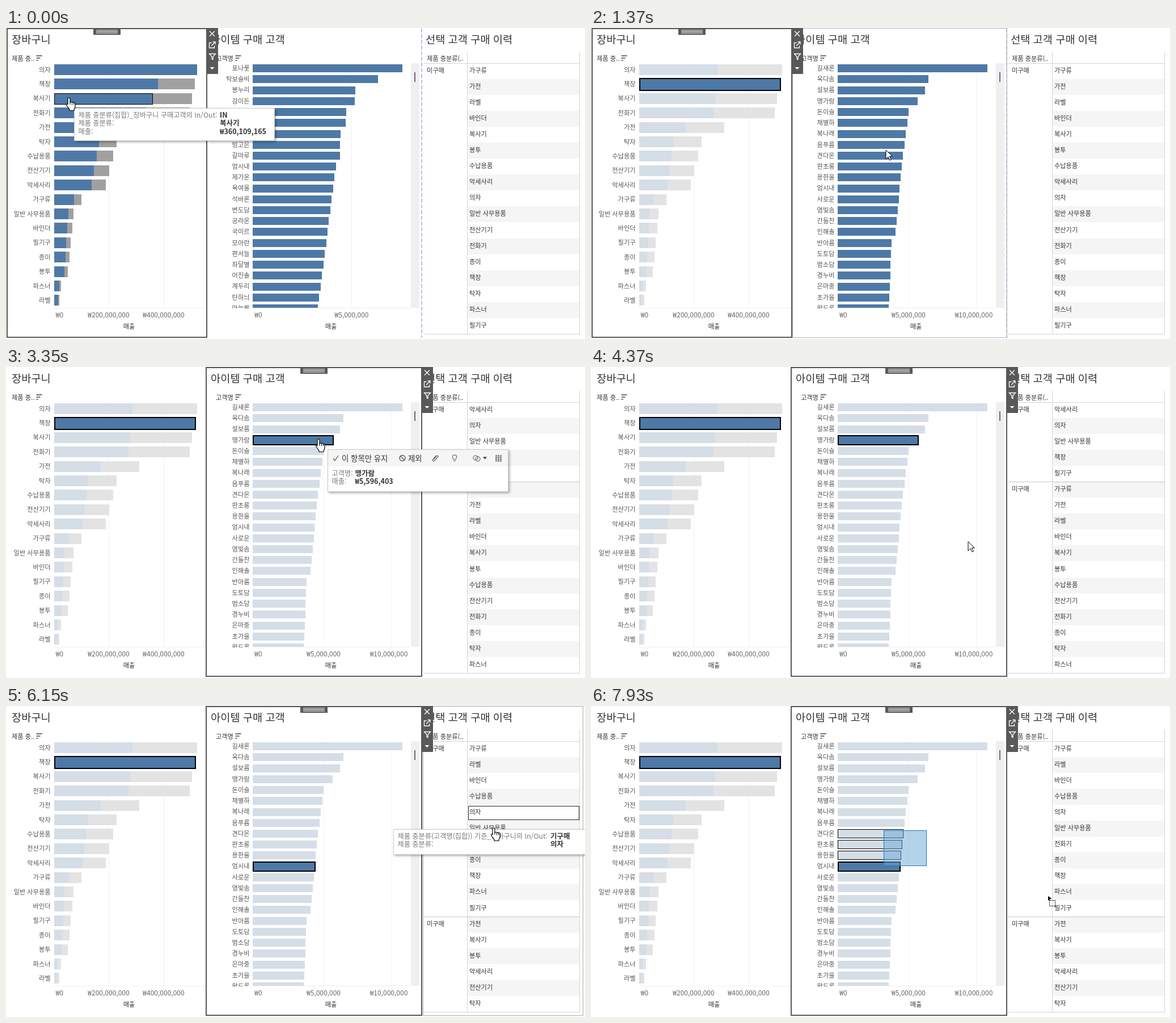
Recreate the animation shown at these times as an HTML page. Size 1021 by 548 pixels, loop 8 s.

```html
<!DOCTYPE html>
<html lang="ko">
<head>
<meta charset="utf-8">
<title>장바구니</title>
<style>
  html, body { margin: 0; width: 100%; height: 100%; overflow: hidden; background: #fff; }
  svg { display: block; width: 1021px; height: 548px; }
  rect { shape-rendering: crispEdges; }
  text { font: 11.2px "Noto Sans CJK KR", "Noto Sans CJK", "Noto Sans", sans-serif; fill: #333; white-space: pre; }
  .title { font-size: 18.7px; }
  .end { text-anchor: end; fill: #555; }
  .mid { text-anchor: middle; }
  .tick { text-anchor: middle; font-size: 12px; fill: #666; }
  .key { font-size: 12.2px; fill: #787878; }
  .val { font-size: 12.5px; font-weight: 700; }
  .cmd { font-size: 13.4px; }
  .tip { filter: drop-shadow(2px 2px 2px #0005); }
</style>
</head>
<body>
<svg viewBox="0 0 1021 548"><g id="base"></g><g id="live"></g></svg>
<script>
const BLUE = '#4e79a7', GREY = '#a0a0a0', PALE_BLUE = '#d5dde7', PALE_GREY = '#e3e3e3', DARK = '#595959';
const LOOP = 8000, STEP = 70;
const PICK_ITEM = 890, RELOAD = 1030, PICK_A = 2880, SHOW_A = 3350, LEAVE_A = 3550;
const PICK_B = 5250, LEAVE_B = 5530, AIM = 7030, DRAG = 7310, DROP = 7790;

// Straight lines through a few [index, value] points
const curve = (...pts) => i => {
  const k = Math.max(1, pts.findIndex(p => p[0] >= i)), [x0, y0] = pts[k - 1], [x1, y1] = pts[k];
  return y0 + (y1 - y0) * (i - x0) / (x1 - x0);
};

const items = '의자,책장,복사기,전화기,가전,탁자,수납용품,전산기기,악세사리,가구류,일반 사무용품,바인더,필기구,종이,봉투,파스너,라벨'.split(',');
const sorted = [...items].sort();
const itemEnd = curve([0, 337], [3, 324], [4, 235], [5, 195], [8, 176], [9, 133], [10, 119], [14, 109], [15, 97], [16, 94]);
const shareAll = curve([0, 1], [1, .74], [3, .68], [4, .76], [5, .72], [16, .75]);
const sharePick = () => .55;
const inEnd = (i, share) => 84.5 + (itemEnd(i) - 84.5) * share(i);

const buyers = [
  {
    names: '표나룻 탁보슬비 봉누리 감이든 피노을 방울찬 옥다솜 빙고은 갈마루 엄시내 제가온 육여울 석바론 변도담 공라온 국미르 모아란 편서늘 좌달별 어진솔 계두리 탄하늬 마늘봄'.split(' '),
    end: curve([0, 699], [1, 656], [2, 615.5], [3, 614.5], [4, 600], [5, 599], [6, 589.5], [8, 588.5], [9, 581.5], [22, 550]),
    ticks: [[609.5, '₩5,000,000']]
  },
  {
    names: '길새론 옥다솜 설보름 맹가람 돈이슬 채별하 복나래 음푸름 견다온 판초롱 용한울 엄시내 사로운 염빛솜 간들찬 인해솔 반아름 도토담 범소담 경누비 은마중 초가을 왕도롬'.split(' '),
    end: curve([0, 699], [1, 595], [2, 588.5], [3, 575.5], [4, 560], [9, 548], [15, 537], [16, 530], [22, 525]),
    ticks: [[560, '₩5,000,000'], [680, '₩10,000,000']]
  }
];
const bought = {
  3: ['악세사리', '의자', '일반 사무용품', '책장', '필기구'],
  11: ['가구류', '라벨', '바인더', '수납용품', '의자', '일반 사무용품', '전화기', '종이', '책장', '파스너', '필기구']
};
const itemSales = { 1: 380511201, 2: 360109165 };
const buyerSales = { 3: 5596403, 11: 4331430 };

// Pointer moves: start, end, goal
const home = [111, 123], corner = [516, 219];
const moves = [
  [70, 820, 246, 97],
  [RELOAD, 1370, 520, 215],
  [1570, 2320, 553, 129],
  [2390, 2670, 551, 127],
  [LEAVE_A, 3820, 840, 250],
  [4090, 4580, 560, 290],
  [4780, 4920, 505, 284],
  [LEAVE_B, 6000, 860, 200],
  [6150, 6150, 860, 215],
  [6220, 6900, 604, 228],
  [AIM, 7240, ...corner],
  [DRAG, DROP, 591, 281],
  [7860, 7930, 806, 335]
];

// Each move sags a little, in proportion to its width.
function pointer(t) {
  let [x, y] = home;
  for (const [a, b, gx, gy] of moves) {
    if (t < a) break;
    const count = Math.floor((b - a) / STEP) + 1;
    const p = Math.min(1, (Math.floor((t - a) / STEP) + 1) / count);
    const sag = Math.abs(gx - x) * .5 * p * (1 - p);
    x += (gx - x) * p;
    y += (gy - y) * p + sag;
  }
  return [x, y];
}

const text = (x, y, s, cls = '') => `<text x="${x}" y="${y}" class="${cls}">${s}</text>`;
const rect = (x, y, w, h, fill, more = '') => `<rect x="${x}" y="${y}" width="${w}" height="${h}" fill="${fill}" ${more}/>`;
const line = (d, color, w = 1, more = '') => `<path d="${d}" fill="none" stroke="${color}" stroke-width="${w}" ${more}/>`;
const box = (x, y, w, h, color, sw, fill = 'none') => rect(x, y, w, h, fill, `stroke="${color}" stroke-width="${sw}"`);
const won = n => '₩' + n.toLocaleString('en-US');
const itemY = i => 74 + 25.4 * i;
const buyerY = i => 71.2 + 19.22 * i;
const cellY = i => 61.5 + 28.1 * i;
const sortIcon = x => line(`M${x} 49h10M${x} 53h7M${x} 57h3`, '#444', 1.5);

function itemSheet(picked, share) {
  let s = text(10, 26.5, '장바구니', 'title') + text(10, 58, '제품 중..') + sortIcon(53.5);
  s += line('M181.5 62V493M278.5 62V493M84.5 493.5H352', '#f0f0f0');
  items.forEach((name, i) => {
    const y = itemY(i), top = Math.round(y - 10);
    s += text(78.5, y + 3.5, name, 'end');
    if (picked && i === 1) s += box(86, top, 248, 21, '#000', 2, BLUE);
    else s += rect(85, top, itemEnd(i) - 85, 19, picked ? PALE_GREY : GREY) +
      rect(85, top, inEnd(i, share) - 85, 19, picked ? PALE_BLUE : BLUE);
  });
  return s + text(94.5, 510, '₩0', 'tick') + text(181, 510, '₩200,000,000', 'tick') +
    text(278, 510, '₩400,000,000', 'tick') + text(217, 530, '매출', 'mid');
}

function buyerSheet({ names, end, ticks }, sel) {
  let s = text(361, 26.5, '아이템 구매 고객', 'title') + text(370, 57.5, '고객명') + sortIcon(404.5);
  for (const [x] of ticks) s += line(`M${x} 62V493`, '#f0f0f0');
  names.forEach((name, i) => {
    const y = buyerY(i);
    s += text(429.5, y + 3.8, name, 'end');
    s += rect(435, Math.round(y - 7), end(i) - 435, 14, sel < 0 ? BLUE : PALE_BLUE);
  });
  if (sel >= 0) s += box(436, Math.round(buyerY(sel) - 8), end(sel) - 435, 16, '#000', 2, BLUE);
  s += rect(357, 493.5, 374, 14, '#fff') + line('M435 493.5H712', '#eee');
  s += rect(714, 62, 15, 431, '#efeff0') + rect(720, 78, 2, 17, '#75647f');
  for (const [x, label] of ticks) s += text(Math.min(x, 675), 510, label, 'tick');
  return s + text(445, 510, '₩0', 'tick') + text(573, 530, '매출', 'mid');
}

const cells = sel => {
  const own = bought[sel] || [];
  return { own, rows: [...own, ...sorted.filter(n => !own.includes(n))] };
};

function historySheet(sel) {
  const { own, rows } = cells(sel), split = own.length;
  let s = text(740, 26.5, '선택 고객 구매 이력', 'title') + text(742, 57.5, '제품 중분류(..');
  rows.forEach((name, i) => {
    const y = cellY(i);
    if (i % 2) s += rect(814, y, 198, 28, '#f5f5f5');
    s += text(817, y + 17, name);
  });
  s += line('M736 62.5H1012M736 539.5H1012M813.5 42V540M1011.5 42V540', '#d4d4d4');
  if (split) s += text(742, cellY(0) + 17, '기구매') + line(`M736 ${Math.round(cellY(split)) + .5}H1012`, '#c8c8c8');
  return s + text(742, cellY(split) + 17, '미구매') + line('M733 1V546', '#b3c6df', 2, 'stroke-dasharray="7 3"');
}

function activeFrame(x, w) {
  const mid = x + w / 2, r = x + w, c = r + 9.5;
  return box(x, 1, w, 544, DARK, 2) +
    rect(mid - 24, 0, 48, 12, DARK) +
    line(`M${mid - 19} 4h38m-38 2.5h38m-38 2.5h38`, '#fff') +
    rect(r, 0, 20, 81, DARK) +
    line(`M${c - 4.5} 5.5l9 9m0-9l-9 9M${c - 1} 26h-4v9h9v-4M${c + 1} 24.5h4.5v4.5m0-4.5l-7 7M${c - 5} 45.5h11l-4.5 5v5l-2-1v-4z`, '#fff', 1.3) +
    `<path d="M${c - 4} 69h8l-4 4z" fill="#fff"/>`;
}

function tooltip(x, y, w, valueX, rows, commands) {
  const bar = commands ? 30 : 0, h = bar + 17.5 + 13.2 * rows.length;
  let s = `<g class="tip">${box(.5, .5, w, h, '#ccc', 1, '#fff')}</g>`;
  if (commands) {
    s += rect(1, 1, w - 1, 29, '#f5f5f5') + text(25, 20.5, '이 항목만 유지', 'cmd') + text(142, 20.5, '제외', 'cmd');
    s += line('M10 16l3 4 6-9M128 11.5l8 8m1-4a5 5 0 1 1-10 0a5 5 0 1 1 10 0', '#555', 1.3);
    s += line('M187 18l5-6q3-2 3 1l-6 7q-3 2-4-1l6-8M222 18q-4-8 2-8t2 8zM222 20.5h4M257 15a4 4 0 1 0 8 0a4 4 0 1 0-8 0M261 17a4 4 0 1 0 8 0a4 4 0 1 0-8 0', '#666', 1.2);
    s += '<path d="M274 13.5h7l-3.5 4z" fill="#333"/>';
    s += line('M296 11.5h11m-11 3h11m-11 3h11m-11 3h11', '#666', 1.8, 'stroke-dasharray="3 1"');
  }
  rows.forEach(([key, value], i) => {
    const ty = bar + 16.5 + 14.5 * i;
    s += text(7.5, ty, key, 'key') + text(valueX, ty, value, 'val');
  });
  return `<g transform="translate(${Math.round(x)} ${Math.round(y)})">${s}</g>`;
}

const itemTip = (x, y, i, cmd) => tooltip(x, y, 353, 257, [
  ['제품 중분류(집합)_장바구니 구매고객의 In/Out:', 'IN'], ['제품 중분류:', items[i]], ['매출:', won(itemSales[i])]], cmd);
const buyerTip = (x, y, data, i, cmd) => tooltip(x, y, cmd ? 318 : 133, 48.5, [
  ['고객명:', data.names[i]], ['매출:', won(buyerSales[i] || Math.round((data.end(i) - 435) * 39687.3))]], cmd);

const icons = {
  hand: '<path d="M-2 2q0-2 2-2t2 2v6q1.5-1.5 3.5 0q1.5-1 3 .5q2.5-.5 2.5 2v5q0 3-2 5v2h-8v-2l-5-7q-1-2 .5-2.5t1.5 1z" fill="#fff" stroke="#000" stroke-width="1.2"/><path d="M2 8v4M5.5 8.5v4M8.5 9v3" stroke="#000"/>',
  arrow: '<path d="M0 0v16l4-4 3 6 2.5-1-3-6h5z" fill="#fff" stroke="#000"/>',
  drag: '<path d="M0 0l6 4-6 4z"/><rect x="2.5" y="7.5" width="10" height="10" fill="none" stroke="#000" stroke-dasharray="2 1"/>'
};

const baseLayer = (t, sel, data) =>
  itemSheet(t >= PICK_ITEM, t >= RELOAD ? sharePick : shareAll) +
  buyerSheet(data, sel) + historySheet(t >= SHOW_A ? sel : -1);

function liveLayer(t, sel, data) {
  const [x, y] = pointer(t), ty = y + 17.5;
  const clicked = t >= PICK_ITEM && t < RELOAD || t >= SHOW_A && t < LEAVE_A || t >= PICK_B && t < LEAVE_B;
  const tx = x + (clicked ? 15.5 : 5 + x * .035);
  let s = '', tip = '', icon = 'arrow';

  if (t >= RELOAD && t < PICK_A && x > 355) s += box(355.5, .5, 378, 545, '#b0b4bb', 1);
  if (t >= SHOW_A && t < AIM && x > 735) s += box(735.5, .5, 282, 545, '#aaa', 1);

  const item = items.findIndex((_, i) => Math.abs(y - itemY(i)) < 10.2 && x < itemEnd(i));
  if (item >= 0) {
    icon = 'hand';
    if (t < PICK_ITEM) s += box(85.5, Math.round(itemY(item) - 10) + .5, inEnd(item, shareAll) - 85, 19, '#000', 1);
    if (t < RELOAD && itemSales[item]) tip = itemTip(tx, ty, item, clicked);
  }

  const outline = i => box(435.5, Math.round(buyerY(i) - 8) + .5, data.end(i) - 435, 15, '#000', 1);
  if (t >= DRAG) {
    const [x0, y0] = corner, [x1, y1] = pointer(Math.min(t, DROP));
    icon = 'drag';
    data.names.forEach((_, i) => {
      const cy = buyerY(i);
      if (i !== sel && data.end(i) > x0 && cy + 7 > y0 && cy - 7 < y1) s += outline(i);
    });
    s += rect(x0 + .5, y0 + .5, x1 - x0, y1 - y0, '#69a8d6', 'fill-opacity=".5" stroke="#1c77c0"');
  } else {
    const row = data.names.findIndex((_, i) => Math.abs(y - buyerY(i)) < 7.5 && x > 435 && x < data.end(i));
    if (row >= 0) {
      icon = 'hand';
      if (row !== sel) s += outline(row);
      if (t < AIM && (row !== sel || clicked)) tip = buyerTip(tx, ty, data, row, clicked);
    }
    // The table's tooltip trails the pointer by one step.
    const [lx, ly] = pointer(t - STEP);
    if (x > 815) icon = 'hand';
    if (lx > 815) {
      const { own, rows } = cells(sel), i = Math.floor((ly - 61.5) / 28.1);
      s += box(815.5, Math.round(cellY(i) + 2) + .5, 195, 24, '#222', 1);
      tip = tooltip(683, ly + 17, 345, 277, [
        ['제품 중분류(고객명(집합)) 기준_장바구니의 In/Out:', i < own.length ? '기구매' : '미구매'],
        ['제품 중분류:', rows[i]]]);
    }
  }

  s += t < PICK_A ? activeFrame(2, 352) : activeFrame(353, 380);
  return s + tip + `<g transform="translate(${x.toFixed(1)} ${y.toFixed(1)})">${icons[icon]}</g>`;
}

const shown = {};
function put(id, html) {
  if (shown[id] !== html) document.getElementById(id).innerHTML = shown[id] = html;
}

const start = performance.now();
function frame() {
  const t = (performance.now() - start) % LOOP;
  const sel = t >= PICK_B ? 11 : t >= PICK_A ? 3 : -1;
  const data = buyers[+(t >= RELOAD)];
  put('base', baseLayer(t, sel, data));
  put('live', liveLayer(t, sel, data));
  requestAnimationFrame(frame);
}
frame();
</script>
</body>
</html>
```
